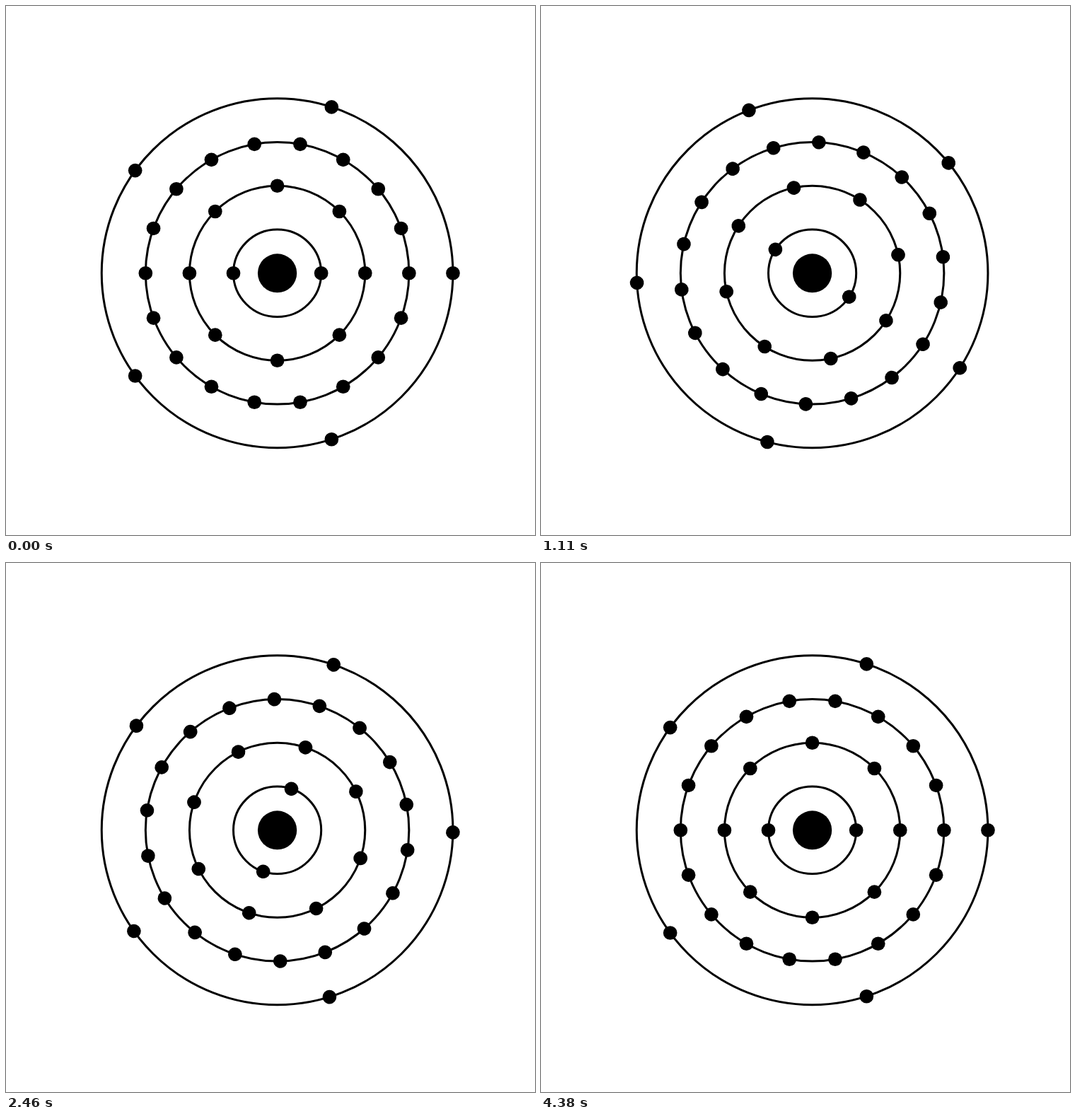
An HTML page that plays this animation: 748 by 748 pixels, repeating every 4.51 s.

```html
<!DOCTYPE html>
<html lang="en">
<head>
<meta charset="utf-8">
<title>Electron shells</title>
<style>
  html, body { margin: 0; width: 100%; height: 100%; overflow: hidden; background: #fff; }
  svg { display: block; width: 100%; height: 100%; }
</style>
</head>
<body>
<svg viewBox="0 0 748 748">
  <g id="atom" transform="translate(383.6 377.8) scale(1.0055 1)">
    <circle r="27.5"/>
    <g id="electrons"></g>
  </g>
</svg>
<script>
  const SHELLS = [2, 8, 18, 5];
  const GAP = 61.75;
  const STEP = 30, LAST = 146, LOOP = 4510;
  const SPAN = 150;      // steps in the full easing curve
  const RAMP = 0.03;     // share of the curve spent speeding up
  const TURN = 720;

  const atom = document.getElementById('atom');
  const electrons = document.getElementById('electrons');

  function circle(parent, attrs) {
    const el = document.createElementNS('http://www.w3.org/2000/svg', 'circle');
    for (const key in attrs) el.setAttribute(key, attrs[key]);
    parent.append(el);
  }

  SHELLS.forEach((count, i) => {
    const r = GAP * (i + 1);
    circle(atom, { r, fill: 'none', stroke: '#000', 'stroke-width': 3 });
    for (let k = 0; k < count; k++) {
      const a = 2 * Math.PI * k / count;
      circle(electrons, { cx: r * Math.cos(a), cy: r * Math.sin(a), r: 9.8 });
    }
  });

  // Cubic in for a short ramp, cubic out for the rest.
  function ease(p) {
    return p < RAMP
      ? p ** 3 / RAMP ** 2
      : 1 - (1 - p) ** 3 / (1 - RAMP) ** 2;
  }

  function draw(time) {
    const step = Math.min(LAST, Math.floor(time % LOOP / STEP + 1e-6));
    const angle = step === LAST ? 0 : TURN * ease(step / SPAN);
    electrons.setAttribute('transform', `rotate(${angle})`);
  }

  const start = performance.now();
  function tick() {
    draw(performance.now() - start);
    requestAnimationFrame(tick);
  }
  tick();
</script>
</body>
</html>
```
